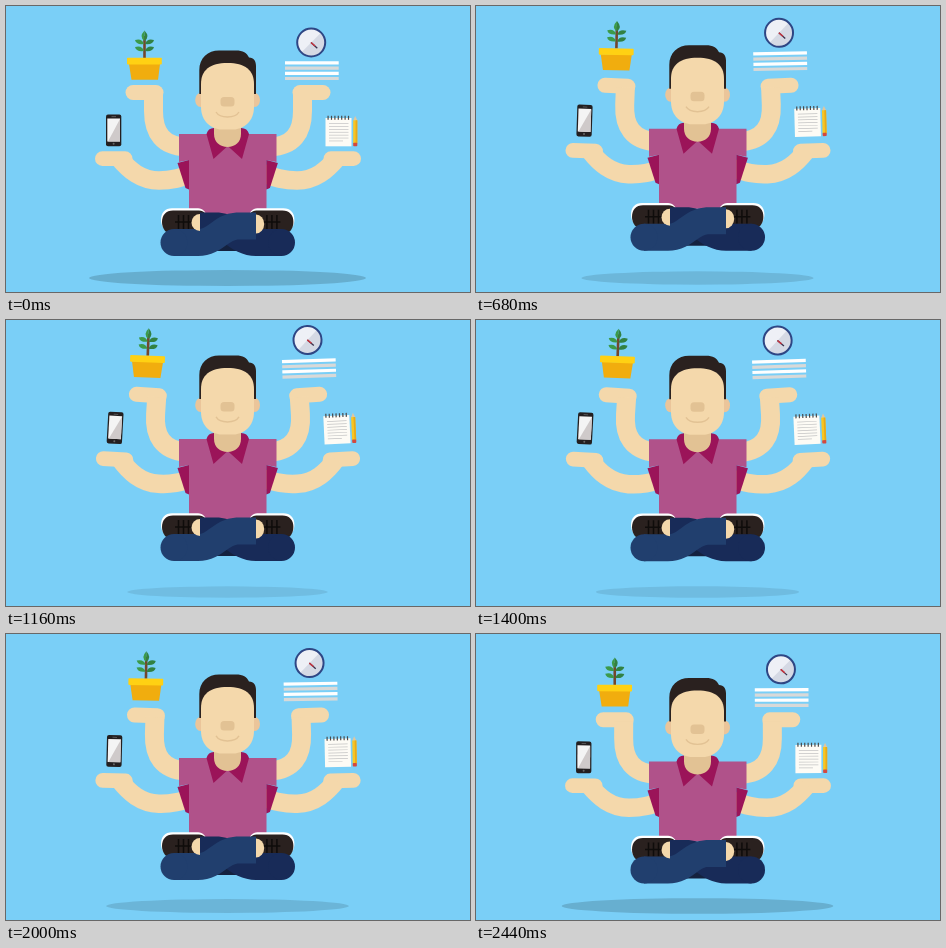
Animation of 464x286 px, one loop 2.52 s. Source, as an HTML page with a canvas:

```html
<!DOCTYPE html>
<html lang="en">
<head>
<meta charset="utf-8">
<title>Floating multitasker</title>
<style>
html, body { margin: 0; width: 100%; height: 100%; overflow: hidden; background: #7acff7; }
canvas { display: block; }
</style>
</head>
<body>
<canvas id="stage" width="464" height="286"></canvas>
<script>
const ctx = document.getElementById('stage').getContext('2d');
const LOOP = 2520, STEP = 40, LAST = 2440;
const SKIN = '#f4d8ab', SKIN_SHADE = '#e2c294', SHIRT = '#b0528a', TRIM = '#9b1459';
const JEANS = '#213f6e', NAVY = '#182b58', DARK = '#2a211f';

function fill(path, color) {
  ctx.fillStyle = color;
  ctx.fill(new Path2D(path));
}

function stroke(path, color, width, cap = 'butt') {
  ctx.strokeStyle = color;
  ctx.lineWidth = width;
  ctx.lineCap = cap;
  ctx.stroke(new Path2D(path));
}

function box(x, y, w, h, color, radius = 0) {
  ctx.fillStyle = color;
  ctx.beginPath();
  ctx.roundRect(x, y, w, h, radius);
  ctx.fill();
}

function ellipse(x, y, rx, ry, color, from = 0, to = Math.PI * 2) {
  ctx.fillStyle = color;
  ctx.beginPath();
  ctx.ellipse(x, y, rx, ry, 0, from, to);
  ctx.fill();
}

// Draws a part moved by (dx, dy) and turned about (x, y).
function posed(x, y, dx, dy, angle, draw) {
  ctx.save();
  ctx.translate(x + dx, y + dy);
  ctx.rotate(angle);
  ctx.translate(-x, -y);
  draw();
  ctx.restore();
}

function mirrored(axis, draw) {
  ctx.save();
  ctx.translate(axis * 2, 0);
  ctx.scale(-1, 1);
  draw();
  ctx.restore();
}

function bothSides(axis, draw) {
  draw();
  mirrored(axis, draw);
}

function shadow(p) {
  ellipse(221.5, 272, 138.5 - 41.5 * p, 8 - 2.5 * p, `rgba(0,0,0,${0.16 - 0.08 * p})`);
}

function arms(p) {
  posed(176, 135, 0, 0, 0.073 * p, () => {
    box(119.5, 79, 38, 15, SKIN, 7.5);
    stroke('M147.5 88V105C147.5 127 157 140 180 141', SKIN, 19);
  });
  posed(180, 165, 0, 0, 0.066 * p, () => {
    box(89, 145.3, 37.5, 14.7, SKIN, 7.4);
    stroke('M113 152C123 164 135 174.5 153 174.5C166 174.5 174 172 188 167', SKIN, 18.5);
  });
}

function torso() {
  fill('M173 128H270.5V156L260.5 154V208H183V154L173 156Z', SHIRT);
  bothSides(221.7, () => fill('M171.5 157L183 154V183.5L179.5 182Z', TRIM));
  fill('M200.5 128Q202 122 208 122H235Q241.5 122 243 128L236 153L221.7 140L207.5 153Z', TRIM);
  fill('M208 118H235V128C235 136 229 141 221.5 141C214 141 208 136 208 128Z', SKIN_SHADE);
}

function head() {
  bothSides(221.6, () => ellipse(194.5, 94, 5.3, 7, '#ebc59a'));
  fill('M193.3 88V64C193.3 52 202 44.5 213 44.5H230C237 44.5 241 47 243 51.5C248 52 250 55 250 60V88Z', DARK);
  fill('M195 78C195 64 204 57 221.5 57C239 57 248 64 248 78V101C248 115 238 123.5 227 123.5H216C205 123.5 195 115 195 101Z', SKIN);
  box(214.5, 91, 14, 9.5, SKIN_SHADE, 3.5);
  stroke('M210 106Q213 111 221.5 111Q230 111 233 106', SKIN_SHADE, 1.4);
}

function shoe() {
  const upper = 'M167 204.5H193C198 205 201 208 201 212V228H167C160 228 156 223 156 216C156 209 160 204.5 167 204.5Z';
  posed(0, 0, -1, -2.2, 0, () => fill(upper, '#fff'));
  fill(upper, DARK);
  stroke('M169 216H186M172.5 209V223M177.5 209V223M182.5 209V223', '#0f0c0b', 1.5);
}

function legs() {
  bothSides(221.7, shoe);
  fill('M194 230H250L238 245H206Z', '#14223f');
  stroke('M194 220H212C226 221 232 236.5 250 236.5H275.5', NAVY, 27);
  ellipse(275.5, 236.5, 13.5, 13.5, NAVY);
  stroke('M250 220H231C214 221 210 236.5 192 236.5H168', JEANS, 27);
  ellipse(168, 236.5, 13.5, 13.5, JEANS);
  ellipse(194, 216.5, 8.5, 8.5, SKIN, Math.PI / 2, Math.PI * 1.5);
  ellipse(250, 218, 8.2, 9.5, SKIN, -Math.PI / 2, Math.PI / 2);
}

function plant() {
  stroke('M138.5 30V52', '#74472c', 2.6);
  for (const y of [36, 43]) {
    fill(`M138 ${y + 2}Q130 ${y + 3} 129 ${y - 2}Q136 ${y - 4} 138 ${y + 2}Z`, '#3c9a4a');
    fill(`M139 ${y + 2}Q147 ${y + 3} 148 ${y - 2}Q141 ${y - 4} 139 ${y + 2}Z`, '#318143');
  }
  fill('M138.5 24.5Q132.5 31 138.5 35Z', '#3c9a4a');
  fill('M138.5 24.5Q144.5 31 138.5 35Z', '#318143');
  fill('M123 58H154L152 73.7H125.5Z', '#f1ad0e');
  box(121, 51.8, 34.8, 6.7, '#ffd113', 0.8);
}

function phone() {
  box(100, 108.5, 15.3, 31.8, '#231f20', 2);
  box(101.3, 112.5, 12.7, 23, '#f4f4f4');
  fill('M114 113V135.5H102Z', '#cfcaca');
  box(105.5, 110.3, 4.5, 0.8, '#666');
  ellipse(107.6, 137.8, 1, 1, '#666');
}

function clock() {
  ellipse(305.2, 36.5, 14, 14, '#eef0f6');
  ellipse(305.2, 36.5, 13, 13, '#d5d9e4', -Math.PI / 4, Math.PI * 0.75);
  ctx.strokeStyle = '#2e4684';
  ctx.lineWidth = 2;
  ctx.beginPath();
  ctx.arc(305.2, 36.5, 14, 0, Math.PI * 2);
  ctx.stroke();
  stroke('M305 36.5L311.3 42.3', '#39304c', 1.3);
  stroke('M305 36.5L309 40', '#c8343f', 1.5);
}

function paperStack() {
  for (let i = 0; i < 4; i++) {
    box(279, 55.3 + i * 5.2, 53.7, 3.2, i % 2 ? '#d8d9d8' : '#fff');
  }
}

function notepad() {
  box(319.5, 112, 26, 28.3, '#fdfbf5');
  for (let i = 0; i < 7; i++) {
    box(321.5 + i * 3.4, 109.8, 1.2, 4, '#4a4a4a');
    box(323, 117.2 + i * 2.9, i === 6 ? 14 : 19.5, 0.7, '#c3c3c3');
  }
  fill('M347.2 114.5L349.2 110L351.3 114.5Z', '#e3c69b');
  box(347.2, 114.3, 4.1, 23, '#f8c622');
  box(349.6, 114.3, 1.7, 23, '#e6a91c');
  box(347.2, 136.8, 4.1, 3.4, '#d3493f', 0.8);
}

function draw(time) {
  const t = Math.min(Math.floor((time % LOOP) / STEP) * STEP, LAST);
  const p = 1 - Math.abs(1 - t / (LOOP / 2));

  ctx.fillStyle = '#7acff7';
  ctx.fillRect(0, 0, 464, 286);
  shadow(p);

  ctx.save();
  ctx.translate(0, -9.8 * p);
  bothSides(222, () => arms(p));
  torso();
  head();
  legs();
  ctx.restore();

  posed(138.5, 50, 3.6 * p, -17.6 * p, 0.04 * p, plant);
  posed(107.6, 124, 1.6 * p, -18 * p, 0.06 * p, phone);
  posed(305.2, 36.5, -4 * p, -18 * p, -0.04 * p, clock);
  posed(306, 65, -3 * p, -17.6 * p, -0.035 * p, paperStack);
  posed(335, 126, -1.7 * p, -18 * p, -0.05 * p, notepad);
}

const start = performance.now();
function tick() {
  draw(performance.now() - start);
  requestAnimationFrame(tick);
}
tick();
</script>
</body>
</html>
```
